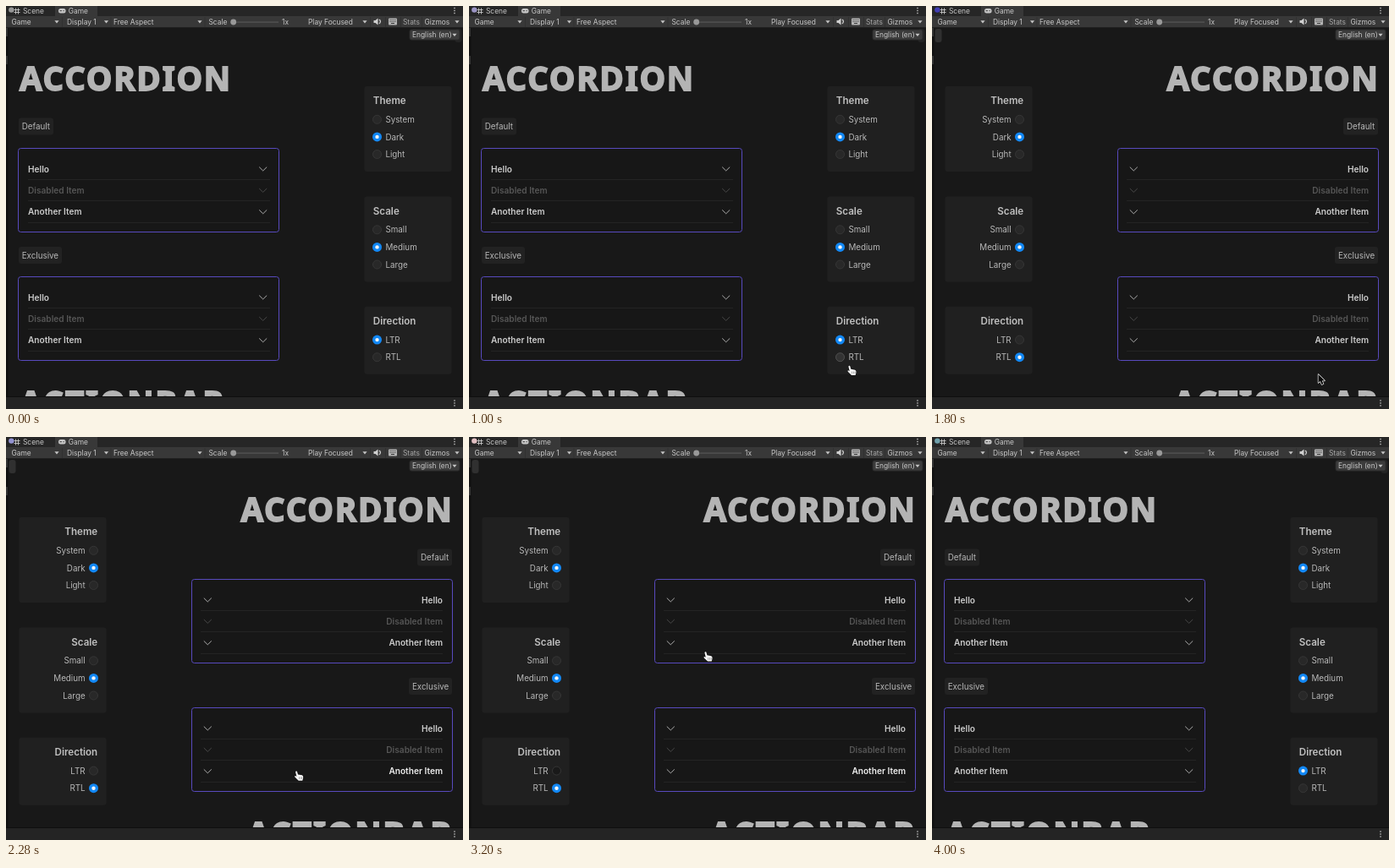
An HTML page with a canvas that plays this animation: 540x477 px, repeating every 4.04 s.

```html
<!DOCTYPE html>
<html lang="en">
<head>
<meta charset="utf-8">
<title>Accordion direction demo</title>
<style>
html, body { margin: 0; width: 100%; height: 100%; overflow: hidden; background: #181818; }
canvas { display: block; }
</style>
</head>
<body>
<canvas id="stage" width="540" height="477"></canvas>
<script>
const g = document.getElementById('stage').getContext('2d');
const LOOP = 4040, MIRROR = 542;
const TO_RTL = 1620, TO_LTR = 3320, SETTLE = 100;
const HAND = new Path2D('M0 1C0-.6 2-.6 2.1 1L2.9 3.8 7.8 4.7Q9.6 5.4 9 8.2L8.2 11H3.6L0 7.6Q-1.8 5.8-.2 5.4L1.3 6.2Z');
const ARROW = new Path2D('M0 0V10L2.3 8 4 12 6 11.2 4.3 7.5H7.5Z');

// time, x, y of the pointer tip
const POINTER = [
  [200, 425, 457], [480, 446, 409], [800, 446, 409], [1080, 449, 430],
  [1200, 449, 430], [1440, 456.5, 436], [1840, 456.5, 436], [2080, 440, 398],
  [2640, 107, 390], [2980, 107, 390], [3360, 383, 172], [3680, 548, 60]
];
// time, red, green, blue of the corner dot
const DOT = [
  [0, 150, 150, 150], [560, 204, 140, 165], [1060, 150, 150, 200], [1560, 72, 150, 225],
  [1800, 66, 62, 180], [2300, 150, 150, 210], [2800, 240, 240, 240],
  [3360, 222, 175, 178], [4000, 110, 160, 172], [4040, 150, 150, 150]
];

let rtl = false;

function sample(keys, time, ease = p => p) {
  const i = Math.max(1, keys.findIndex(k => k[0] >= time));
  const a = keys[i - 1], b = keys[i];
  const p = ease((time - a[0]) / (b[0] - a[0]));
  return a.slice(1).map((v, n) => v + (b[n + 1] - v) * p);
}
const smooth = p => p * p * (3 - 2 * p);
const between = (t, a, b) => t >= a && t < b;
const flipX = (x, w = 0) => rtl ? MIRROR - x - w : x;

function rect(x, y, w, h, color) {
  g.fillStyle = color;
  g.fillRect(x, y, w, h);
}
function box(x, y, w, h, r, fill, stroke) {
  g.beginPath();
  g.roundRect(x, y, w, h, r);
  if (fill) { g.fillStyle = fill; g.fill(); }
  if (stroke) { g.strokeStyle = stroke; g.lineWidth = 1; g.stroke(); }
}
function disc(x, y, r, fill, stroke) {
  g.beginPath();
  g.arc(x, y, r, 0, 7);
  g.fillStyle = fill;
  g.fill();
  if (stroke) { g.strokeStyle = stroke; g.lineWidth = 1; g.stroke(); }
}
function line(color, width, ...points) {
  g.beginPath();
  points.forEach(([x, y]) => g.lineTo(x, y));
  g.strokeStyle = color;
  g.lineWidth = width;
  g.stroke();
}
function text(str, x, y, font, color, align = 'left') {
  g.font = font;
  g.fillStyle = color;
  g.textAlign = align;
  g.fillText(str, x, y);
}
const label = (str, x, y, size, color, weight = 400, family = 'Inter') =>
  text(str, flipX(x), y, `${weight} ${size}px "${family}", sans-serif`, color, rtl ? 'right' : 'left');
const small = (str, x, y, color = '#c8c8c8') =>
  text(str, x, y, '8.4px Inter, sans-serif', color);

function caret(x, y) {
  g.beginPath();
  g.moveTo(x - 2.6, y - 1.4);
  g.lineTo(x + 2.6, y - 1.4);
  g.lineTo(x, y + 1.8);
  g.fillStyle = '#c4c4c4';
  g.fill();
}
function menuDots(y) {
  for (const d of [-3, 0, 3]) rect(529.3, y + d - .7, 1.4, 1.4, '#c4c4c4');
}

// Bold type thickened by an outline for an extra heavy weight
function heading(str, y) {
  const x = rtl ? 13.5 : 16;
  g.letterSpacing = '1.8px';
  label(str, x, y, 38.5, '#b4b4b4', 800, 'Noto Sans');
  g.strokeStyle = '#b4b4b4';
  g.lineWidth = 1.8;
  g.lineJoin = 'miter';
  g.miterLimit = 3;
  g.strokeText(str, flipX(x), y);
  g.letterSpacing = '0px';
}
function chip(str, y, w) {
  box(flipX(15, w), y, w, 20, 3, '#222222');
  label(str, 18.7, y + 13.6, 9.8, '#b8b8b8');
}
function accordion(y, hover) {
  box(flipX(14.5, 308), y - .5, 308, 99, 3, '#171717', '#584abe');
  ['Hello', 'Disabled Item', 'Another Item'].forEach((str, i) => {
    const cy = y + 24 + i * 25.4, off = i === 1;
    label(str, 26, cy + 3.5, 10.15, off ? '#565656' : i === 2 && hover ? '#eeeeee' : '#cccccc', 600);
    const cx = flipX(303.7);
    line(off ? '#484848' : '#acacac', 1, [cx - 4.5, cy - 2.4], [cx, cy + 2], [cx + 4.5, cy - 2.4]);
    rect(flipX(26, 286), Math.round(cy + 12), 286, 1, '#242424');
  });
}

function radio(str, y, state) {
  const x = flipX(438.5);
  const fills = { on: '#1288f5', full: '#1288f5', hover: '#333333', dark: '#191919', leaving: '#191919', off: '#282828' };
  const lit = state === 'on' || state === 'full';
  disc(x, y, lit ? 5.5 : 5, fills[state], lit ? null : state === 'hover' ? '#505050' : '#363636');
  if (state === 'on' || state === 'leaving') disc(x, y, 2.2, '#f4f4f4');
  label(str, 448.4, y + 3.6, 9.8, '#b8b8b8');
}
function card(title, y, h, options, states) {
  box(flipX(423.5, 103), y, 103, h, 3, '#202020');
  label(title, 433.8, y + 21.2, 11.6, '#c0c0c0', 600);
  options.forEach((str, i) => radio(str, y + 39.3 + i * 20.6, states[i]));
}

function directionStates(t) {
  if (between(t, TO_RTL, TO_RTL + SETTLE)) return ['leaving', 'full'];
  if (between(t, TO_LTR, TO_LTR + SETTLE)) return ['full', 'leaving'];
  if (rtl) return [t > 2720 ? 'dark' : t > 2600 ? 'hover' : 'off', 'on'];
  return ['on', between(t, 440, 1200) ? 'hover' : between(t, 1200, TO_RTL) ? 'dark' : 'off'];
}

function page(t) {
  rect(0, 25, 540, 438, '#181818');
  box(flipX(530.5, 8), 27, 8, 16, 3, rtl ? '#303030' : '#242424');
  heading('ACCORDION', 99.5);
  chip('Default', 132.5, 41);
  accordion(169, false);
  chip('Exclusive', 285, 51);
  accordion(321, between(t, 2080, 2400) || between(t, 3080, 3440));
  heading('ACTIONBAR', 483.5);
  card('Theme', 95, 101, ['System', 'Dark', 'Light'], ['off', 'on', 'off']);
  card('Scale', 225.5, 101, ['Small', 'Medium', 'Large'], ['off', 'on', 'off']);
  card('Direction', 355.8, 80, ['LTR', 'RTL'], directionStates(t));
}

function editor(t) {
  rect(0, 25, 2.5, 438, '#101010');
  rect(0, 26, 2, 10, '#343434');
  rect(0, 59, 2, 10, '#343434');

  rect(0, 0, 540, 12, '#262626');
  rect(58, 0, 50, 12, '#383838');
  rect(0, 12, 540, 13, '#383838');
  rect(0, 25, 540, 1, '#202020');

  // tabs
  for (const d of [11, 14]) {
    rect(d, 2.5, 1, 7, '#bbbbbb');
    rect(9.5, d - 7, 7, 1, '#bbbbbb');
  }
  small('Scene', 20, 9);
  box(62, 3, 8.5, 5.5, 2.5, '#c8c8c8');
  rect(63.5, 5.2, 2.4, 1, '#383838');
  rect(67.5, 5.2, 1.2, 1, '#383838');
  small('Game', 73.8, 9);
  menuDots(5.5);

  // toolbar
  small('Game', 6.5, 21.8);
  small('Display 1', 72, 21.8);
  small('Free Aspect', 127, 21.8);
  small('Scale', 239.5, 21.8);
  small('1x', 326, 21.8);
  small('Play Focused', 357, 21.8);
  small('Stats', 469, 21.8, '#a8a8a8');
  small('Gizmos', 494.5, 21.8);
  for (const x of [60, 118.5, 229, 424, 533]) caret(x, 18.6);
  for (const x of [66, 123.5, 234.5, 430, 448, 466, 491]) rect(x, 13, 1, 12, '#303030');
  rect(265, 18.6, 57, 1, '#5c5c5c');
  disc(268.7, 19, 3.4, '#999999');
  g.fillStyle = '#d0d0d0';
  g.fill(new Path2D('M434.5 17H436.5L439.5 14.5V22.5L436.5 20H434.5Z'));
  g.beginPath();
  g.arc(439.5, 18.5, 2.8, -1.1, 1.1);
  g.strokeStyle = '#cccccc';
  g.lineWidth = 1.2;
  g.stroke();
  box(452, 14.5, 10, 8, 1, '#b4b4b4');
  for (const y of [16, 18]) for (let x = 453.5; x < 461; x += 2) rect(x, y, 1, 1, '#383838');
  rect(455, 20, 4, 1, '#383838');

  box(477, 28, 59, 12, 2, '#3c3c3c', '#2a2a2a');
  small('English (en)', 480, 37.2);
  caret(530, 34.2);

  // status strip
  rect(0, 462, 540, 1, '#0e0e0e');
  rect(0, 463, 540, 14, '#242424');
  menuDots(470);

  disc(6.3, 4.6, 3.2, `rgb(${sample(DOT, t).map(Math.round)})`);
}

function pointer(t) {
  if (!between(t, POINTER[0][0], POINTER.at(-1)[0])) return;
  const [x, y] = sample(POINTER, t, smooth);
  const arrow = t < 400 || between(t, TO_RTL, 2000) || between(t, 2480, 2610) || t > 3420;
  const shape = arrow ? ARROW : HAND;
  g.save();
  g.translate(x, y);
  g.lineJoin = 'round';
  g.lineWidth = 1.4;
  g.strokeStyle = arrow ? '#eeeeee' : '#151515';
  g.fillStyle = arrow ? '#080808' : '#f4f4f4';
  g.stroke(shape);
  g.fill(shape);
  if (!arrow) for (const d of [4, 5.8, 7.4]) rect(d, 6.7, .6, 2.5, '#777777');
  g.restore();
}

const start = performance.now();
function draw(now) {
  const t = Math.max(0, now - start) % LOOP;
  rtl = between(t, TO_RTL, TO_LTR);
  page(t);
  editor(t);
  pointer(t);
  requestAnimationFrame(draw);
}
draw(start);
</script>
</body>
</html>
```
